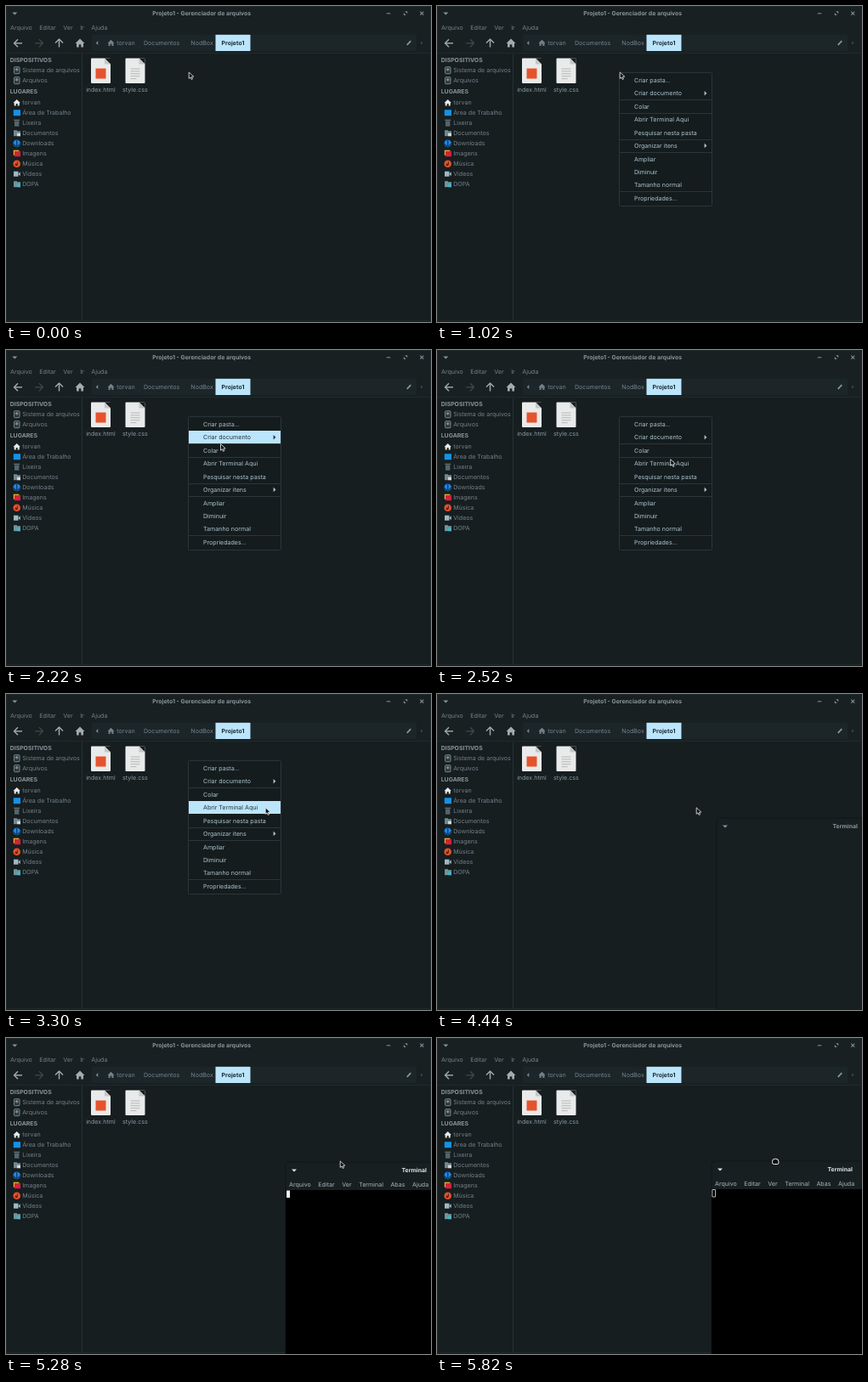
An HTML page with a canvas for the animation above (5.88 s loop, 500x372 px).

```html
<!DOCTYPE html>
<html lang="pt">
<head>
<meta charset="utf-8">
<title>Gerenciador de arquivos</title>
<style>
html, body { margin: 0; height: 100%; overflow: hidden; background: #161e20; }
canvas { display: block; width: 500px; height: 372px; }
</style>
</head>
<body>
<canvas id="stage" width="500" height="372"></canvas>
<script>
const c = document.getElementById('stage').getContext('2d');
const LOOP = 5880, STEP = 60;
const BG = '#161e20', LINE = '#263034', DIM = '#74838a', TITLE = '#89959a', ICON = '#a0adb3', HOT = '#bbe5fb';
const MENU = ['Arquivo', 'Editar', 'Ver', 'Ir', 'Ajuda'];
const TERM_MENU = ['Arquivo', 'Editar', 'Ver', 'Terminal', 'Abas', 'Ajuda'];
const clamp = v => Math.max(0, Math.min(1, v));

function rect(x, y, w, h, color) {
  c.fillStyle = color;
  c.fillRect(x, y, w, h);
}
function round(x, y, w, h, r, fill, stroke) {
  c.beginPath();
  c.roundRect(x, y, w, h, r);
  paint(fill, stroke);
}
function disc(x, y, r, fill) {
  c.beginPath();
  c.arc(x, y, r, 0, 7);
  paint(fill);
}
// Polygon or polyline with points relative to (x, y).
function shape(x, y, points, fill, stroke, width) {
  c.beginPath();
  points.forEach(([px, py]) => c.lineTo(x + px, y + py));
  if (fill) c.closePath();
  paint(fill, stroke, width);
}
function paint(fill, stroke, width = 1) {
  if (fill) { c.fillStyle = fill; c.fill(); }
  if (stroke) { c.strokeStyle = stroke; c.lineWidth = width; c.stroke(); }
}
function turned(x, y, angle, fn) {
  c.save();
  c.translate(x, y);
  c.rotate(angle * Math.PI / 180);
  fn();
  c.restore();
}
// Both point right when the angle is 0.
const caret = (x, y, angle, r, color) =>
  turned(x, y, angle, () => shape(0, 0, [[-r / 2, -r], [-r / 2, r], [r / 2, 0]], color));
const arrow = (x, y, angle, color) => turned(x, y, angle, () => {
  shape(0, 0, [[-5, 0], [4.5, 0]], null, color, 1.4);
  shape(0, 0, [[0, -4.5], [4.5, 0], [0, 4.5]], null, color, 1.4);
});

function text(s, x, y, color = DIM, align = 'left', bold = false) {
  c.font = bold ? '700 6.92px Inter, sans-serif' : '400 7.08px Inter, sans-serif';
  c.textAlign = align;
  c.fillStyle = color;
  c.fillText(s, x, y + 2.7);
}
const heading = (s, x, y, color = TITLE, align) => text(s, x, y, color, align, true);
function row(labels, x, y, gap, color) {
  for (const s of labels) {
    text(s, x, y, color);
    x += c.measureText(s).width + gap;
  }
}

function house(x, y, s, color) {
  shape(x, y, [[-5.5 * s, 0.5 * s], [0, -5 * s], [5.5 * s, 0.5 * s]], color);
  rect(x - 4 * s, y, 2.7 * s, 5 * s, color);
  rect(x + 1.3 * s, y, 2.7 * s, 5 * s, color);
  rect(x - 4 * s, y, 8 * s, 1.8 * s, color);
}
function folder(y, color, badge) {
  rect(9, y - 3.5, 4, 2, color);
  rect(9, y - 2.5, 8, 6, color);
  rect(13, y, 4, 3.5, badge);
}
function drive(y) {
  round(9.5, y - 4, 6.5, 8, 1, '#2b373b', '#78878d');
  disc(12.7, y - 1, 1.8, '#78878d');
}

const places = [
  ['torvan', y => house(12.7, y, 0.75, '#e4eaec')],
  ['Área de Trabalho', y => rect(8.8, y - 3.5, 8.2, 7, '#1492e6')],
  ['Lixeira', y => { rect(9.2, y - 4, 7, 1.2, '#66757b'); rect(10, y - 2.3, 5.4, 6.3, '#56656b'); }],
  ['Documentos', y => folder(y, '#71868f', '#cfd8dc')],
  ['Downloads', y => { disc(12.7, y, 4.3, '#2188e6'); arrow(12.7, y, 90, '#10406e'); }],
  ['Imagens', y => { rect(8.8, y - 4, 6.5, 6, '#e8b92e'); rect(10, y - 2.8, 7, 6.3, '#d8203c'); }],
  ['Música', y => { disc(12.7, y, 4.3, '#e5532d'); disc(12.2, y + 1, 1.5, '#5f2014'); rect(13, y - 2.5, 0.9, 3.5, '#5f2014'); }],
  ['Vídeos', y => { rect(9, y - 3, 5.5, 6, '#9fb8c4'); caret(15.5, y, 180, 2.5, '#9fb8c4'); }],
  ['DOPA', y => folder(y, '#6f949e', '#3fb6c6')]
];

function file(x, name) {
  round(x, 61.5, 23, 29.5, 1, '#e9eaea');
  shape(x + 23, 61.5, [[0, 0], [-7, 0], [0, 7]], BG);
  shape(x + 16, 61.5, [[0, 0], [7, 7], [0, 7]], '#c3c7c8');
  text(name, x + 11.4, 98.2, '#8b9ba3', 'center');
}

function fileManager() {
  rect(0, 0, 500, 372, BG);
  rect(0, 0, 500, 55, '#182022');
  round(0.5, 0.5, 499, 370, [4, 4, 0, 0], null, '#1f292c');

  caret(10.3, 9, 90, 3, TITLE);
  heading('Projeto1 - Gerenciador de arquivos', 230.2, 8.3, TITLE, 'center');
  rect(447.7, 8.3, 4.6, 1, TITLE);
  caret(471.5, 7, -45, 2, TITLE);
  caret(468.5, 10, 135, 2, TITLE);
  for (const a of [45, -45]) turned(489.3, 8.7, a, () => rect(-2.8, -0.5, 5.6, 1, TITLE));
  row(MENU, 5, 25.3, 8.6);

  arrow(14, 43.8, 180, ICON);
  arrow(39, 43.8, 0, '#3b474b');
  arrow(62.5, 43.5, -90, ICON);
  house(87, 43.5, 1, ICON);

  round(101, 34, 382, 19, 2, '#1c2629');
  caret(107, 43.5, 180, 2.5, '#7c898e');
  caret(489.3, 43.5, 0, 2, '#445055');
  house(123.5, 43.4, 0.72, DIM);
  text('torvan', 130.3, 43.4);
  row(['Documentos', 'NodBox'], 162, 43.4, 13);
  rect(246.5, 33.8, 41, 19.2, HOT);
  heading('Projeto1', 267, 43.4, '#1c2a31', 'center');
  turned(474, 43.5, -45, () => rect(-3.2, -0.9, 6.4, 1.8, TITLE));

  rect(0, 55, 500, 1, '#1f292c');
  rect(89, 56, 1, 315, LINE);
  heading('DISPOSITIVOS', 4.7, 62.9);
  heading('LUGARES', 4.7, 100.6);
  ['Sistema de arquivos', 'Arquivos'].forEach((s, i) => {
    drive(75.7 + 12 * i);
    text(s, 19.2, 75.7 + 12 * i);
  });
  places.forEach(([s, icon], i) => {
    icon(113.7 + 12 * i);
    text(s, 19.2, 113.7 + 12 * i);
  });

  file(100, 'index.html');
  rect(105.5, 73.5, 12, 12, '#e5532d');
  file(140.5, 'style.css');
  for (let i = 0; i < 5; i++) rect(146.5, 73.5 + 2.9 * i, i == 4 ? 7 : 11, 1, '#b3b8ba');
}

// '-' starts a new group, '>' marks a submenu.
const items = ['Criar pasta...', 'Criar documento>', '-Colar', '-Abrir Terminal Aqui', 'Pesquisar nesta pasta',
  '-Organizar itens>', '-Ampliar', 'Diminuir', 'Tamanho normal', '-Propriedades...'];
const ROW = 15.42, TOP = 79.6;

function menu(hover, alpha) {
  c.globalAlpha = alpha;
  round(214.5, 78.5, 109, 157, 1, '#151c1e', '#2b363a');
  items.forEach((s, i) => {
    const top = Math.round(TOP + ROW * i), mid = TOP + ROW * (i + 0.5), on = i == hover;
    if (s.startsWith('-')) rect(215, top, 108, 1, '#2b363a');
    if (on) rect(215, top, 108, 15, HOT);
    const color = on ? '#22333b' : '#adc5d0';
    text(s.replace(/[->]/g, ''), 232, mid, color);
    if (s.endsWith('>')) caret(316, mid, 0, 2.8, color);
  });
  c.globalAlpha = 1;
}

function terminal(ready, grabbed) {
  const bright = ready ? '#dbe4e8' : TITLE;
  round(329, 146, 200, 260, [4, 0, 0, 0], '#171f21', '#10171a');
  caret(339, 156, 90, 3, bright);
  heading('Terminal', 465.5, 155.6, bright);
  if (!ready) return;
  row(TERM_MENU, 333, 172.3, 8.6, '#a9b8be');
  rect(329, 179, 200, 230, '#000');
  if (grabbed) round(329.9, 179.5, 3.6, 8.5, 0, null, '#b4b4b4');
  else rect(330, 179.5, 4, 8.5, '#f4f4f4');
}

// Pointer moves: start, end, dx, dy; the last one drags the window.
const drag = [5640, 5820, -6, -1];
const moves = [[1440, 1980, 24, 22], [2040, 2580, 40, 32.4], [2640, 3120, 26, 1.5], [4800, 5340, 99, 12.5], drag];
const shift = (t, [start, end, dx, dy]) => {
  const k = clamp((t - start) / (end - start));
  return [dx * k, dy * k];
};
const pointer = t => moves.reduce(([x, y], m) => {
  const [dx, dy] = shift(t, m);
  return [x + dx, y + dy];
}, [215.2, 77.9]);

function hovered(t) {
  const i = Math.floor((pointer(t)[1] - TOP) / ROW);
  return items[i] == '-Colar' ? -1 : i;
}
function cursor(x, y, grabbed) {
  const ink = '#0b0e0f', rim = '#f2f2f2';
  if (grabbed) round(x - 3.7, y - 3, 7.4, 6.2, [3, 3, 1.5, 2], ink, rim);
  else shape(x, y, [[0, 0], [0, 7.5], [1.8, 6], [3, 8.6], [4.3, 8], [3.2, 5.5], [5.6, 5.2]], ink, rim, 0.8);
}

function draw(now) {
  const t = Math.floor(now % LOOP / STEP) * STEP;
  const grabbed = t >= 5460;
  c.textRendering = 'geometricPrecision';
  c.lineJoin = 'round';
  fileManager();

  const alpha = Math.min(clamp((t - 660) / 120), clamp((3600 - t) / 240));
  if (alpha) menu(hovered(t - STEP), alpha);

  if (t >= 4440) {
    c.save();
    c.translate(...shift(t, drag));
    terminal(t >= 4560, grabbed);
    c.restore();
  }
  cursor(...pointer(t), grabbed);
  requestAnimationFrame(() => draw(performance.now()));
}
draw(0);
</script>
</body>
</html>
```
